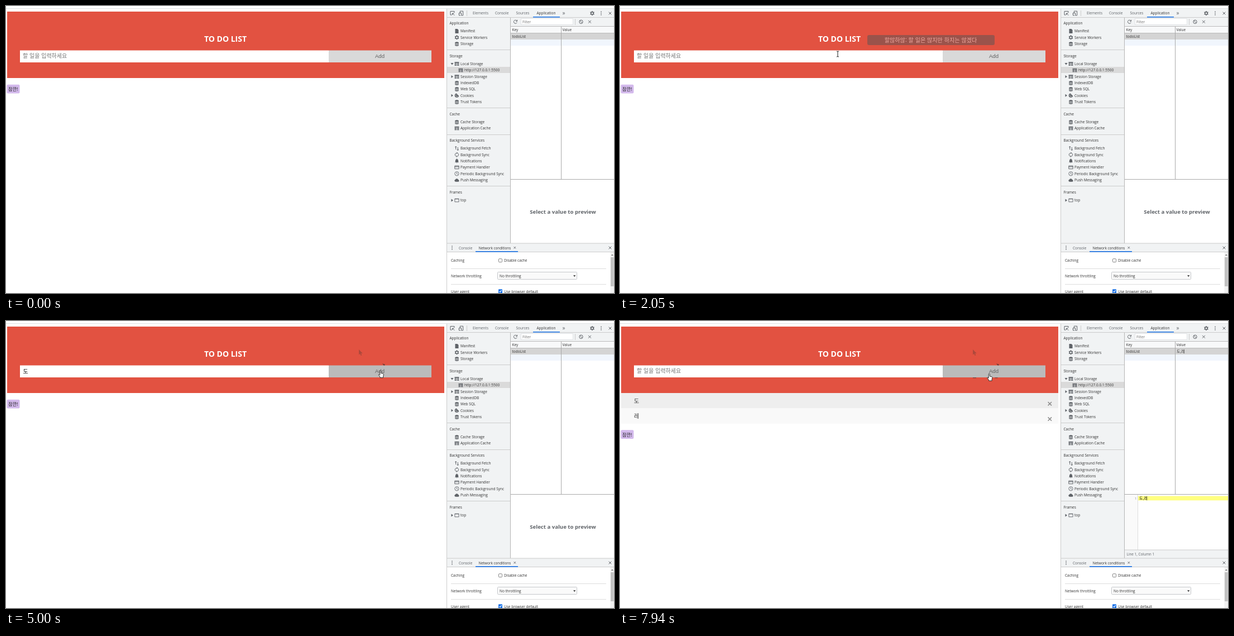
Recreate the animation shown at these times as an HTML page. Size 1089 px wide and 514 px high, loop 8000 ms.

```html
<!DOCTYPE html>
<html lang="ko">
<head>
<meta charset="utf-8">
<title>To do list</title>
<style>
html, body { margin: 0; width: 100%; height: 100%; overflow: hidden; background: #fff; }
svg { display: block; width: 1089px; height: 514px; }
text { font: 6.5px 'Open Sans', 'Noto Sans', 'Noto Sans CJK KR', 'Noto Sans CJK', sans-serif; fill: #333; white-space: pre; }
text.ko { font: 10px 'Noto Sans CJK KR', 'Noto Sans CJK', sans-serif; }
</style>
</head>
<body>
<svg id="stage" viewBox="0 0 1089 514"></svg>
<script>
const NS = 'http://www.w3.org/2000/svg';
const stage = document.getElementById('stage');
const LOOP = 8000;

function el(tag, attrs = {}, parent = stage) {
  const node = document.createElementNS(NS, tag);
  for (const key in attrs) node.setAttribute(key, attrs[key]);
  parent.append(node);
  return node;
}
const group = (parent = stage) => el('g', {}, parent);
const rect = (x, y, w, h, fill, parent, more) => el('rect', { x, y, width: w, height: h, fill, ...more }, parent);
const hline = (x, y, w, fill = '#ccc', parent) => rect(x, y, w, 1, fill, parent);
const vline = (x, y, h, fill = '#ccc', parent) => rect(x, y, 1, h, fill, parent);
const path = (d, attrs, parent) => el('path', { d, fill: 'none', ...attrs }, parent);

// Labels are placed by their vertical centre.
function label(x, cy, str, { size = 6.5, fill = '#333', weight = 400, anchor = 'start', font = '', parent } = {}) {
  const node = el('text', { x, y: cy + size * 0.35, 'text-anchor': anchor }, parent);
  node.style.cssText = `font-size:${size}px;font-weight:${weight};fill:${fill};` + (font && `font-family:${font}`);
  node.textContent = str;
  return node;
}
function korean(x, cy, str, { size = 10, fill = '#333', anchor = 'start', parent } = {}) {
  const node = label(x, cy, str, { size, fill, anchor, parent });
  node.setAttribute('class', 'ko');
  node.style.fontFamily = "'Noto Sans CJK KR','Noto Sans CJK',sans-serif";
  node.setAttribute('y', cy + size * 0.38);
  return node;
}

const INK = '#5f6368', BAR = '#f1f3f4';
const ICONS = {
  doc: ['M-3-4H1L3-2V4H-3Z'],
  db: ['M-3.4-2.7Q0-4.6 3.4-2.7V-1.5Q0-.3-3.4-1.5ZM-3.4-.7Q0 .5 3.4-.7V.7Q0 1.9-3.4.7ZM-3.4 1.5Q0 2.7 3.4 1.5V2.9Q0 4.5-3.4 2.9Z'],
  table: ['M-4-3.2H4V-1.6H-4ZM-4-1H-.4V.8H-4ZM.4-1H4V.8H.4ZM-4 1.4H-.4V3.2H-4ZM.4 1.4H4V3.2H.4Z'],
  cookie: ['M0-3.8A3.8 3.8 0 1 0 3.8 0L2 0 1.8-1.8 0-2ZM-1.8-1.4A.7.7 0 1 0-1.7-1.4ZM-1 1.2A.7.7 0 1 0-.9 1.2ZM1.4 1.5A.6.6 0 1 0 1.5 1.5Z'],
  bell: ['M-3.6 2.4L-2.6 1.3V-1Q-2.4-3 -.6-3.3V-4H.6V-3.3Q2.4-3 2.6-1V1.3L3.6 2.4ZM-1 3H1Q0 4.6-1 3Z'],
  cloud: ['M-2.4 2.8A2.1 2.1 0 0 1-2.6-1.3A2.9 2.9 0 0 1 2.6-.9A1.9 1.9 0 0 1 2.6 2.8Z'],
  gear: ['M2.3 0A2.3 2.3 0 1 1-2.3 0A2.3 2.3 0 1 1 2.3 0M0-4V-2.4M0 4V2.4M-3.5-2L-2-1.2M3.5 2L2 1.2M-3.5 2L-2 1.2M3.5-2L2-1.2', 1.5],
  updown: ['M-1.8 2V-3.5M-3.3-2L-1.8-3.6-.3-2M1.8-2V3.5M.3 2L1.8 3.6 3.3 2', 1],
  sync: ['M-2 2.4A3 3 0 0 1 0-3H1M0-4.4L1.4-3 0-1.6M2-2.4A3 3 0 0 1 0 3H-1M0 4.4L-1.4 3 0 1.6', 1],
  card: ['M-3.7-2.7H3.7V2.7H-3.7ZM-3.7-1H3.7', 1],
  clock: ['M3.6 0A3.6 3.6 0 1 1-3.6 0A3.6 3.6 0 1 1 3.6 0M0-2.2V.3L1.6 1.3', .9],
  frame: ['M-3.6-2.8H3.6V2.8H-3.6ZM-3.6-2.3H3.6', .9],
  close: ['M-2.4-2.4L2.4 2.4M2.4-2.4L-2.4 2.4', 1],
  block: ['M3.2 0A3.2 3.2 0 1 1-3.2 0A3.2 3.2 0 1 1 3.2 0M-2.2-2.2L2.2 2.2', 1],
  reload: ['M2.7 1.2A3 3 0 1 1 2.2-2M3-3.5V-1H.6', 1],
  dots: ['M-.7-3.4H.7V-2H-.7ZM-.7-.7H.7V.7H-.7ZM-.7 2H.7V3.4H-.7Z'],
  inspect: ['M-1 3H-3.5V-3.5H3.5V-1M0 0L3.8 3.8M0 3V0H3', 1],
  device: ['M-1 3.8H-3.6V1M-1.7 0V-3.8H3.6V3.8H.5V-.5H-3.6V2', 1],
  right: ['M-1.5-2.5L2 0-1.5 2.5Z'],
  down: ['M-2.5-1.5L0 2 2.5-1.5Z'],
};
function icon(name, x, y, color = INK) {
  const [d, stroke] = ICONS[name];
  const paint = stroke ? { stroke: color, 'stroke-width': stroke } : { fill: color, 'fill-rule': 'evenodd' };
  path(d, { transform: `translate(${x} ${y})`, ...paint });
}

// Page
rect(0, 0, 1089, 514, '#fff');
hline(0, 4, 1089, '#dfe1e3');
rect(2, 10, 783, 119, '#e25241');
label(393, 59.2, 'TO DO LIST', { size: 14, weight: 700, fill: '#fff', anchor: 'middle' });
rect(25, 79.5, 553, 21.5, '#fff');
const addButton = rect(578, 79.5, 184, 21.5, '#d9d9d9');
label(669.5, 90, 'Add', { size: 9.6, fill: '#606060', anchor: 'middle', font: "'Liberation Sans',sans-serif" });

const focusRing = rect(24.2, 79.2, 553.6, 21.6, '#fff', stage, { rx: 1.5, stroke: '#101010', 'stroke-width': 1.4 });
const placeholder = korean(30, 89.4, '할 일을 입력하세요', { fill: '#757575' });
const typed = korean(30.5, 89.8, '', { fill: '#111' });
const underline = rect(30.5, 94.6, 9, .8, '#223a8c');
const caret = rect(30, 85, 1, 10, '#222');

const items = ['도', '레'].map((word, i) => {
  const g = group(), top = 129 + i * 27.4;
  rect(2, top, 783, 27.4, i ? '#f9f9f9' : '#eee', g);
  korean(25, top + 14, word, { parent: g });
  path(`M766.6 ${top + 16}l6.4 6.4m0-6.4l-6.4 6.4`, { stroke: '#8c8c8c', 'stroke-width': 1.5 }, g);
  return g;
});
const notice = group();
rect(1.5, 140.7, 23, 15.8, '#d3b9ec', notice, { rx: 2 });
korean(13, 149, '잠깐!', { size: 8.4, fill: '#222', anchor: 'middle', parent: notice });

const tooltip = group();
rect(443, 52, 228, 18, '#555', tooltip, { rx: 3 });
korean(556.5, 61.2, '할많하않: 할 일은 많지만 하지는 않겠다', { size: 10.1, fill: '#fff', anchor: 'middle', parent: tooltip });

// Developer tools: tab bar
rect(789, 5, 300, 15, BAR);
hline(789, 20, 300);
icon('inspect', 799.5, 13);
icon('device', 815, 13);
vline(825, 8, 10);
[[836, 'Elements'], [876, 'Console'], [913.5, 'Sources']].forEach(([x, s]) => label(x, 13, s, { fill: INK }));
label(950.5, 13, 'Application');
rect(944, 19, 48, 1.5, '#1a73e8');
label(996.5, 12, '»', { size: 10, fill: INK });
icon('gear', 1050, 13);
icon('dots', 1066, 13);
icon('close', 1082, 13);

// Sidebar
rect(789, 21, 115, 404, BAR);
vline(789, 5, 509);
[78, 182, 230, 322].forEach(y => hline(790, y, 113));
rect(790, 109, 113, 11, '#dadada');
[[31, 'Application'], [90, 'Storage'], [194, 'Cache'], [241, 'Background Services'], [334, 'Frames']]
  .forEach(([y, s]) => label(794.5, y, s));
[
  ['doc', 45, 'Manifest'], ['gear', 56.3, 'Service Workers'], ['db', 68, 'Storage'],
  ['table', 103.5, 'Local Storage', 'down'], ['table', 115, 'http://127.0.0.1:5500', '', 7],
  ['table', 126.5, 'Session Storage', 'right'], ['db', 138, 'IndexedDB'], ['db', 149, 'Web SQL'],
  ['cookie', 160.3, 'Cookies', 'right'], ['db', 172, 'Trust Tokens'],
  ['db', 208, 'Cache Storage'], ['table', 219, 'Application Cache'],
  ['updown', 255, 'Background Fetch'], ['sync', 266.3, 'Background Sync'], ['bell', 277.6, 'Notifications'],
  ['card', 289, 'Payment Handler'], ['clock', 300.3, 'Periodic Background Sync'], ['cloud', 312, 'Push Messaging'],
  ['frame', 348, 'top', 'right'],
].forEach(([name, y, s, arrow, indent = 0]) => {
  icon(name, 807.5 + indent, y);
  label(814 + indent, y, s);
  if (arrow) icon(arrow, 799, y);
});

// Storage table
rect(904, 21, 185, 15, BAR);
icon('reload', 912.5, 28.3);
rect(922.5, 22.5, 93, 11, '#fff', stage, { stroke: '#dadce0', 'stroke-width': .8 });
label(925, 28.6, 'Filter', { fill: '#757575' });
vline(1019, 23, 11);
icon('block', 1030, 28.3);
icon('close', 1045.5, 28.3);
hline(904, 36, 185, '#bbb');
rect(904, 37, 185, 11, '#f8f9fa');
hline(904, 48, 185, '#bbb');
rect(904, 49, 185, 11, '#d4d4d4');
rect(904, 60, 185, 11, '#f1f6fd');
vline(903, 21, 404, '#b5b5b5');
vline(994, 37, 273, '#aaa');
hline(904, 310, 185, '#aaa');
label(906.5, 43, 'Key');
label(996.5, 43, 'Value');
label(906.5, 55, 'todoList');
const cell = korean(997, 54.5, '', { size: 6.8 });

// Value preview
const emptyPreview = label(997.5, 369, 'Select a value to preview', { size: 9.6, weight: 700, fill: INK, anchor: 'middle' });
const preview = group();
rect(904, 311, 24, 99, '#fafafa', preview);
vline(927, 311, 99, '#ddd', preview);
rect(928, 313.5, 161, 7.8, '#ffff80', preview);
label(925.5, 317.8, '1', { size: 6, fill: '#888', anchor: 'end', parent: preview });
const code = korean(930, 317.3, '', { size: 7, fill: '#111', parent: preview });
code.style.fontWeight = 500;
rect(904, 410, 185, 15, BAR, preview);
hline(904, 409.5, 185, '#ccc', preview);
label(907.5, 417.7, 'Line 1, Column 1', { size: 6.4, fill: INK, parent: preview });

// Drawer
rect(790, 425, 299, 15, BAR);
hline(790, 424.5, 299);
hline(790, 440, 299);
icon('dots', 799, 433);
label(811, 433.3, 'Console', { fill: INK });
label(846.5, 433.3, 'Network conditions', { size: 6.35 });
path('M909.5 431l3.6 3.6m0-3.6l-3.6 3.6', { stroke: INK, 'stroke-width': .9 });
rect(841, 439, 76, 1.6, '#1a73e8');
icon('close', 1082, 433);
label(797, 456, 'Caching');
label(797, 484, 'Network throttling', { size: 6.4 });
label(797, 511.5, 'User agent');
hline(797, 470, 278, '#ddd');
hline(797, 498, 278, '#ddd');
rect(882.5, 452.7, 6, 6, '#fff', stage, { rx: 1, stroke: '#767676', 'stroke-width': .9 });
label(892, 456, 'Disable cache');
rect(880.5, 476.5, 142, 13, '#fafafa', stage, { rx: 1, stroke: '#c4c7ca' });
label(884, 484, 'No throttling');
path('M1016 482.3h4.4l-2.2 2.7z', { fill: '#333' });
rect(882, 507.3, 7, 7, '#1a73e8', stage, { rx: 1 });
path('M883.5 510.8l1.5 1.6 2.7-3.4', { stroke: '#fff', 'stroke-width': 1.1 });
label(892, 511.5, 'Use browser default');
rect(1082.5, 441, 6.5, 73, '#f1f1f1');
rect(1083, 450, 5.5, 52, '#c1c1c1');
path('M1083.8 447l2-2.6 2 2.6z', { fill: '#777' });

// Pointer traces left on the page
const ARROW = 'M0 0V9.6L2.2 7.6 3.6 11 5.3 10.3 3.9 7H6.8Z';
const traceArrow = path(ARROW, { transform: 'translate(632 51)', fill: '#9c4639', opacity: .75 });
const traceTop = path('M674 76.3L679 77.8 678 79.4H676.5Z', { fill: '#6e3a33' });
const traceDash = path('M632 101.6h6m33.5 0h5', { stroke: '#7c4038', 'stroke-width': 1.2 });

// Pointers, each with its hot spot at 0,0
const halo = el('circle', { r: 7, fill: '#fbf53a' });
const pointers = {
  arrow: path(ARROW, { fill: '#fff', stroke: '#222', 'stroke-width': .8 }),
  beam: path('M-2-5Q0-5 0-4 0-5 2-5M0-4.5V4.5M-2 5Q0 5 0 4 0 5 2 5', { stroke: '#222', 'stroke-width': 1 }),
  light: path('M-2-5Q0-5 0-4 0-5 2-5M0-4.5V4.5M-2 5Q0 5 0 4 0 5 2 5', { stroke: '#eeb0a8', 'stroke-width': .8 }),
  hand: path('M-1 .8Q0-.6 1 .8V5L4.6 5.8Q5.8 6.2 5.6 7.6L4.8 10.5V13H-.8V11.6L-3.4 8Q-3.6 6.6-2.3 7L-1 8.2Z',
    { fill: '#fff', stroke: '#222', 'stroke-width': .9 }),
};

const TRACK = {
  pointer: [
    [370, 'arrow', 197, 471], [440, 'arrow', 300, 262], [500, 'arrow', 390, 110], [570, 'arrow', 453, 24],
    [790, 'arrow', 444, 7], [860, 'arrow', 425, 20], [930, 'arrow', 405, 42], [1000, 'light', 394, 59.5],
    [1850, 'light', 394, 70], [1910, 'beam', 394, 82], [2050, 'beam', 390, 86], [2120, 'beam', 386.5, 89],
    [4180, 'beam', 520, 84], [4240, 'arrow', 632, 51], [4310, 'arrow', 664, 50], [4470, 'arrow', 675, 68],
    [4610, 'hand', 674, 86], [4670, 'hand', 670.8, 88.5],
    [5180, 'hand', 633, 89], [5250, 'beam', 560, 90], [5320, 'beam', 523.5, 90.3],
    [7140, 'beam', 540, 92], [7210, 'beam', 570, 93], [7270, 'hand', 608, 94],
    [7340, 'hand', 645, 94], [7400, 'hand', 671, 94], [7470, 'hand', 661.3, 94],
  ],
  halo: [[2390, 1], [2520, 0], [4740, 1], [4860, 0], [5590, 1], [5740, 0], [7800, 1], [7940, 0]],
  focus: [[2390, 1], [4740, 0], [5590, 1], [7800, 0]],
  caret: [[2390, 30], [2910, 0], [3260, 39.3], [4180, 0], [5590, 30], [6260, 39.3], [6800, 0]],
  typed: [[3260, 'ㄷ'], [3650, '도'], [5060, ''], [6130, 'ㄹ'], [6200, '레'], [7940, '']],
  compose: [[3260, 1], [4740, 0], [6130, 1], [7800, 0]],
  tip: [[1060, .25], [1120, .5], [1190, .75], [1320, 1], [2050, .5], [2120, 0]],
  button: [[0, '#d9d9d9'], [4870, '#cacaca'], [4930, '#bbb'], [5180, '#cacaca'], [5250, '#d9d9d9'], [7940, '#bbb']],
  count: [[0, 0], [5060, 1], [7940, 2]],
};
const at = (name, t) => TRACK[name].findLast(step => step[0] <= t) || [];
const value = (name, t) => at(name, t)[1];
const show = (node, on) => node.setAttribute('visibility', on ? 'visible' : 'hidden');

function render(t) {
  const [, kind, x, y] = at('pointer', t);
  for (const name in pointers) {
    show(pointers[name], name === kind);
    if (name === kind) pointers[name].setAttribute('transform', `translate(${x} ${y})`);
  }
  show(halo, value('halo', t));
  if (kind) halo.setAttribute('transform', `translate(${x} ${y})`);

  const text = value('typed', t) || '', caretX = value('caret', t);
  typed.textContent = text;
  show(placeholder, !text);
  show(underline, value('compose', t));
  show(focusRing, value('focus', t));
  show(caret, caretX);
  caret.setAttribute('x', caretX || 0);
  addButton.setAttribute('fill', value('button', t));
  tooltip.setAttribute('opacity', value('tip', t) || 0);

  const count = value('count', t), stored = ['도', '레'].slice(0, count).join(',');
  items.forEach((item, i) => show(item, i < count));
  notice.setAttribute('transform', `translate(0 ${count * 27.3})`);
  cell.textContent = code.textContent = stored;
  show(emptyPreview, !count);
  show(preview, count);

  show(traceArrow, t >= 4310);
  show(traceTop, t >= 4610);
  show(traceDash, t >= 5180);
}

const start = performance.now();
function tick() {
  render((performance.now() - start) % LOOP);
  requestAnimationFrame(tick);
}
tick();
</script>
</body>
</html>
```
